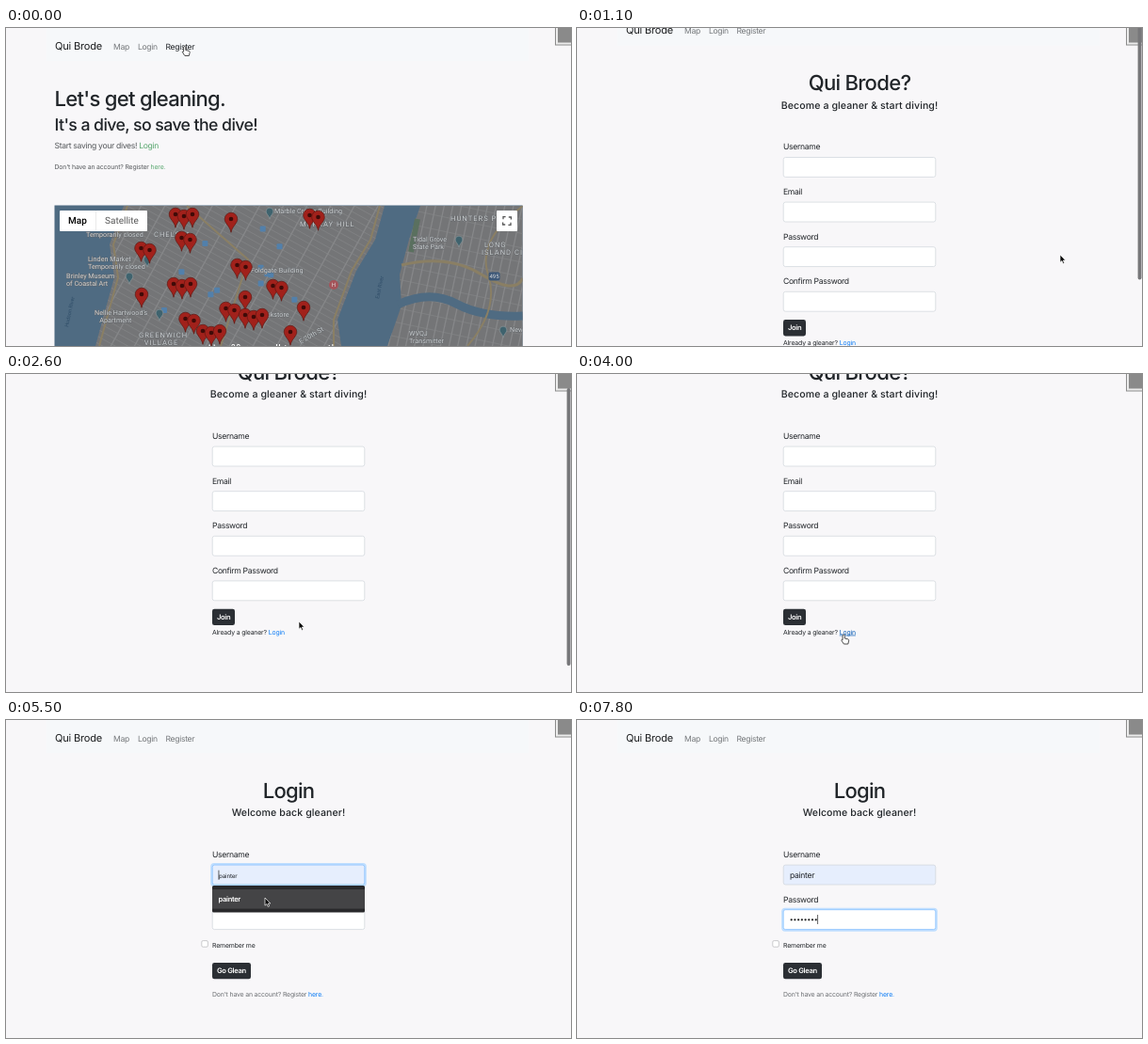
Recreate the animation shown at these times as an HTML page. Size 600 by 338 pixels, loop 8000 ms.

```html
<!DOCTYPE html>
<html lang="en">
<head>
<meta charset="utf-8">
<title>Sign up and log in</title>
<style>
  html, body { margin: 0; width: 100%; height: 100%; overflow: hidden; background: #f8f7f9; }
  svg { display: block; }
  #stage { width: 100vw; height: 100vh; }
  text { font-family: Inter, "Open Sans", sans-serif; font-optical-sizing: none;
         text-rendering: geometricPrecision; fill: #212529; white-space: pre; }
  .h1 { font-size: 22.1px; font-weight: 500; letter-spacing: -.73px; }
  .h2 { font-size: 17.7px; font-weight: 500; letter-spacing: -.58px; }
  .h5 { font-size: 10.6px; font-weight: 500; letter-spacing: .08px; }
  .brand { font-size: 11.07px; letter-spacing: -.2px; fill: #1b1d1f; }
  .body { font-size: 8.6px; letter-spacing: -.32px; }
  .small { font-size: 6.9px; letter-spacing: -.16px; }
  .tiny { font-size: 6.3px; letter-spacing: -.2px; }
  .btn { font-size: 7.6px; font-weight: 600; letter-spacing: -.34px; fill: #fff; }
  .mid { text-anchor: middle; }
  .grey { fill: #6c6f73; }
  .nav { fill: #76797c; }
  .soft { fill: #55585b; }
  .green { fill: #5aa870; }
  .blue { fill: #0a7bf5; }
  .blue.on { fill: #0056b3; text-decoration: underline; }
  .map text { font-family: Roboto, sans-serif; }
  .map .ui { font-size: 10px; fill: #565656; }
  .map .ui.on { font-weight: 500; fill: #000; }
  .map .sign { font-size: 6px; fill: #ddd; text-anchor: middle; }
  .map .poi, .map .area { font-size: 7.2px; fill: #cdd0d2; stroke: #606468; stroke-width: .8px; paint-order: stroke; }
  .map .area { font-size: 7.6px; letter-spacing: 1px; }
  .map .river { font-size: 5.5px; fill: #2f4d68; }
  .map .tip { font-size: 12px; fill: #fff; }
</style>
</head>
<body>
<svg id="stage" viewBox="0 0 600 338" preserveAspectRatio="none"></svg>
<script>
const BRAND = 'Qui Brode', USER = 'painter', LOOP = 8000, STEP = 100;
const ROW = 47.6, DOT = 3.72;

const text = (x, y, cls, s, extra = '') => `<text x="${x}" y="${y}" class="${cls}" ${extra}>${s}</text>`;
const rect = (x, y, w, h, fill, extra = '') =>
  `<rect x="${x}" y="${y}" width="${w}" height="${h}" fill="${fill}" ${extra}/>`;
const path = (d, extra) => `<path d="${d}" ${extra}/>`;
const times = (n, f) => Array.from({ length: n }, (_, i) => f(i)).join('');

const nav = over => rect(43, -20, 512, 55, '#f6f8fa') + text(52, 23, 'brand', BRAND) +
  text(114, 22.5, 'body nav', 'Map') + text(140, 22.5, 'body nav', 'Login') +
  text(169.5, 22.5, over ? 'body' : 'body nav', 'Register');

const title = (big, sub) => text(300, 83, 'h1 mid', big) + text(300, 102.4, 'h5 mid', sub);

const field = (row, label, id) => {
  const y = 153.9 + row * ROW;
  return text(219, y - 7.9, 'body', label) +
    rect(217.2, y - 1.8, 165.6, 25, '#bfdeff', `rx="3.6" id="${id}Ring" visibility="hidden"`) +
    rect(219.2, y + .2, 161.6, 20.9, '#fff', `rx="2.2" stroke="#ced4da" stroke-width=".7" id="${id}Box"`);
};

const button = (y, w, s) => rect(219, y, w, 17.3, '#2b2f34', 'rx="2.3"') + text(224, y + 11.2, 'btn', s);

// --- map -------------------------------------------------------------
const WATER = '#4f6b82', LAND = '#747577';
const ISLAND = 'M125 189 L110 230 L115 265 L95 338 H356 L352 310 L372 258 L392 225 L402 189Z';
const EAST = 'M440 189 L428 225 L418 262 L420 295 L405 338 H549 V189Z';

// Rows of pins: centre x, y and how many stand side by side
const PINS = [[189, 198, 3], [327, 199, 2], [239, 203, 1], [191, 223, 2], [148, 234, 2], [250, 252, 2],
  [187, 272, 3], [288, 274, 2], [144, 283, 1], [254, 286, 1], [238, 298, 2], [263, 305, 3], [195, 309, 2],
  [316, 297, 1], [218, 322, 3], [302, 323, 1]];

// Label x, y, lines and the x of its place mark, if any
const LABELS = [
  [285, 197, 'Marble Crown Building', 280], [85, 222, 'Temporarily closed'],
  [87, 248, 'Linden Market|Temporarily closed', 150], [64, 266, 'Brinley Museum|of Coastal Art', 131],
  [94, 305, 'Nellie Hartwood’s|   Apartment', 163], [260, 260, 'Foldgate Building', 255],
  [268, 307, 'Bookstore'], [432, 227, 'Tidal Grove|State Park', 481],
  [428, 327, 'WVQJ|Transmitter'], [535, 323, 'Newtown', 528]];
const AREAS = [[157, 222, 'CHELSEA'], [312, 211, 'MURRAY HILL'], [472, 205, 'HUNTERS POINT'],
  [505, 233, ' LONG|ISLAND CITY'], [141, 329, 'GREENWICH|  VILLAGE']];

let seed = 7;
const random = () => (seed = seed * 16807 % 2147483647) / 2147483647;

const grid = (clip, cx, cy, deg, gapX, gapY) =>
  `<g clip-path="url(#${clip})"><g transform="translate(${cx} ${cy}) rotate(${deg})" stroke="#868789">` +
  path(times(70, i => `M-300 ${(i - 35) * gapY}h600`), 'stroke-width=".6"') +
  path(times(50, i => `M${(i - 25) * gapX} -300v600`), 'stroke-width="1.3"') + '</g></g>';

const line = (d, color = '#8a7f64', w = 2) => path(d, `fill="none" stroke="${color}" stroke-width="${w}"`);

// A drop of radius r whose point lies below its centre
const drop = (r, fill, edge) => path(
  `M0 ${2.1 * r} C${-.15 * r} ${1.15 * r} ${-r} ${.7 * r} ${-r} 0 A${r} ${r} 0 0 1 ${r} 0 C${r} ${.7 * r} ${.15 * r} ${1.15 * r} 0 ${2.1 * r}Z`,
  `fill="${fill}" stroke="${edge}" stroke-width=".7"`);
const pins = ([x, y, n]) => times(n, i =>
  `<g transform="translate(${x + (i - (n - 1) / 2) * 9} ${y + i % 2 * 2})">` +
  drop(6.8, '#a1211b', '#5f1712') + '<circle r="2.3" fill="#3f0b08"/></g>');
const label = cls => ([x, y, s, mark]) =>
  (mark ? `<g transform="translate(${mark} ${y - 2})">${drop(3.9, '#3f636e', '#8f9598')}</g>` : '') +
  s.split('|').map((part, i) => text(x, y + i * 7.8, cls, part)).join('');
const tilted = (x, y, deg, cls, s) => text(0, 0, cls, s, `transform="translate(${x} ${y}) rotate(${deg})"`);

const map = `<svg class="map" x="51.5" y="188.5" width="497" height="149.5" viewBox="51.5 188.5 497 149.5">
  <clipPath id="isle"><path d="${ISLAND}"/></clipPath><clipPath id="east"><path d="${EAST}"/></clipPath>` +
  rect(51, 188, 498, 150, WATER) + path(ISLAND, `fill="${LAND}"`) + path(EAST, `fill="${LAND}"`) +
  grid('isle', 230, 260, 29, 22, 6.5) + grid('east', 480, 250, 12, 9, 15) +
  line('M416 294 Q450 278 478 293 T549 306', WATER, 9) +
  line('M437 203 L430 238', '#5a705f', 6) +
  line('M129 189 L114 230 L119 265 L99 338') + line('M397 189 L387 225 L367 258 L348 310 V338') +
  line('M192 189 L257 246 L228 338') + line('M420 252 Q470 240 505 262 T549 266', undefined, 3) +
  line('M549 189 Q500 225 512 262 T490 338') +
  times(12, () => rect(165 + 150 * random(), 205 + 100 * random(), 6, 6, '#5280ab', 'rx="1"')) +
  '<circle cx="348" cy="273" r="5" fill="#a5545a"/>' + text(348, 275.2, 'sign', 'H') +
  rect(512.5, 259.5, 12, 9, '#3d5878', 'rx="2"') + text(518.5, 266.2, 'sign', '495') +
  LABELS.map(label('poi')).join('') + AREAS.map(label('area')).join('') +
  tilted(396, 288, -78, 'river', 'East River') + tilted(66, 318, -78, 'river', 'Hudson River') +
  tilted(313, 336, -30, 'poi', 'E 20th St') +
  PINS.map(pins).join('') +
  rect(57, 194, 93, 22, '#fff', 'rx="1"') + rect(95, 194, .6, 22, '#ddd') +
  text(66, 208.4, 'ui on', 'Map') + text(105, 208.4, 'ui', 'Satellite') +
  rect(521, 194, 22, 22, '#fff', 'rx="1"') +
  times(4, i => path('M-4 -1.8V-4.4H-1.4',
    `transform="translate(532 205) rotate(${i * 90})" fill="none" stroke="#555" stroke-width="1.3"`)) +
  text(300, 344.6, 'tip mid', 'Use ⌘ + scroll to zoom the map') + '</svg>';

// --- pages -----------------------------------------------------------
const home = nav(true) + text(51.5, 83, 'h1', 'Let\'s get gleaning.') +
  text(51.5, 109.3, 'h2', 'It\'s a dive, so save the dive!') +
  text(51.5, 127.6, 'body soft', 'Start saving your dives! <tspan class="green">Login</tspan>') +
  text(51.5, 149.6, 'small soft', 'Don\'t have an account? Register <tspan class="green">here.</tspan>') + map;

const register = nav(false) + title(BRAND + '?', 'Become a gleaner &amp; start diving!') +
  ['Username', 'Email', 'Password', 'Confirm Password'].map((s, i) => field(i, s, 'new' + i)).join('') +
  button(326.7, 24, 'Join') +
  text(219, 353.6, 'small', 'Already a gleaner? <tspan class="blue" id="link">Login</tspan>');

const login = nav(false) + title('Login', 'Welcome back gleaner!') +
  field(0, 'Username', 'user') + field(1, 'Password', 'pass') +
  text(226, 168, 'tiny', USER, 'id="hint"') + text(226, 167.6, 'body', USER, 'id="value"') +
  `<g id="dots">${times(8, i => `<circle cx="${227.7 + i * DOT}" cy="212.3" r="1.15" fill="#222"/>`)}</g>` +
  rect(0, 0, .7, 10, '#222', 'id="caret"') +
  rect(207.8, 234.6, 6.6, 6.6, '#fff', 'rx="1.4" stroke="#a9a9ad" stroke-width=".6"') +
  text(219, 241.6, 'small', 'Remember me') + button(258, 41, 'Go Glean') +
  text(219, 294, 'small grey', 'Don\'t have an account? Register <tspan class="blue">here.</tspan>') +
  '<g id="list">' + rect(219, 176, 162, 28.4, '#29292b', 'rx="1.5"') +
  rect(219, 180, 162, 20.6, '#444446', 'id="row"') + text(225.5, 192.8, 'btn', USER) + '</g>';

const hand = path('M2.2 0 C3.2 0 3.3 .8 3.3 1.4 V4 L6.6 4.8 C7.6 5.1 7.8 5.8 7.6 6.8 L6.8 10 H2.4 L.1 6.6 C-.6 5.5 .4 5 1.1 5.7 V1.2 C1.1 .5 1.4 0 2.2 0Z',
  'fill="#fff" stroke="#222" stroke-width=".8" stroke-linejoin="round"');
const arrow = path('M0 0 V8.2 L1.9 6.5 L3.2 9.4 L4.6 8.8 L3.3 6 H5.8Z',
  'fill="#0a0a0a" stroke="#fff" stroke-width=".7" stroke-linejoin="round"');

const $ = id => document.getElementById(id);
$('stage').innerHTML = rect(0, 0, 600, 338, '#f8f7f9') +
  `<g id="home">${home}</g><g id="register">${register}</g><g id="login">${login}</g>` +
  rect(583.5, -2, 18, 20, '#ececec', 'stroke="#8c8c8c"') + rect(586, -2, 15, 17.5, '#8a8a8a') +
  rect(595.6, 0, 3.9, 295, '#77777a', 'id="bar" rx="1.95"') +
  `<g id="arrow">${arrow}</g><g id="hand">${hand}</g>`;

// --- motion ------------------------------------------------------------
// Pointer strokes: from, until, then where the stroke ends
const STROKES = [[0, 500, 472, 156], [700, 900, 513, 241], [2300, 2600, 311, 263], [2600, 3300, 266, 284],
  [3500, 3700, 281, 277], [4400, 5000, 274, 164], [5300, 5500, 275, 189], [5900, 6300, 280, 208]];

const ease = (t, a, b) => {
  const k = Math.max(0, Math.min(1, (t - a) / (b - a)));
  return k * k * (3 - 2 * k);
};
const pointer = t => STROKES.reduce(([x, y], [a, b, tx, ty]) => {
  const k = ease(t, a, b);
  return [x + (tx - x) * k, y + (ty - y) * k];
}, [187.5, 19.5]);

const show = (id, on) => $(id).setAttribute('visibility', on ? 'inherit' : 'hidden');
const move = (id, x, y) => $(id).setAttribute('transform', `translate(${x} ${y})`);
const paint = (id, focus, filled) => {
  show(id + 'Ring', focus);
  $(id + 'Box').setAttribute('stroke', focus ? '#80bdff' : '#ced4da');
  $(id + 'Box').setAttribute('fill', filled ? '#e6eefd' : '#fff');
};

function draw(t) {
  const within = (a, b) => t >= a && t < b;
  show('home', t < 100);
  show('register', within(100, 4200));
  show('login', t >= 4200);

  const scroll = 64 * ease(t, 950, 1400) + 13 * ease(t, 1950, 2300);
  move('register', 0, -scroll);
  $('bar').setAttribute('y', -39.3 + .705 * scroll);
  $('bar').setAttribute('opacity', ease(t, 1000, 1100) - ease(t, 2900, 3300));

  const over = within(3700, 4200), pointing = t < 100 || over;
  $('link').classList.toggle('on', over);
  const [x, y] = pointer(t);
  move('arrow', x, y);
  move('hand', x, y);
  show('hand', pointing);
  show('arrow', !pointing && t < 6600);

  const onUser = within(5000, 6300), onPass = t >= 6300, picked = t >= 5700, hint = within(5400, 5700);
  paint('user', onUser, hint || picked);
  paint('pass', onPass, false);
  show('list', within(5200, 5700));
  show('row', hint);
  show('hint', hint);
  show('value', picked);

  const typed = Math.max(0, Math.min(8, Math.floor((t - 6700) / 100)));
  [...$('dots').children].forEach((d, i) => d.setAttribute('visibility', i < typed ? 'inherit' : 'hidden'));
  show('caret', onUser || onPass);
  $('caret').setAttribute('x', onPass ? 225.6 + typed * DOT : picked ? 253.3 : 225.6);
  $('caret').setAttribute('y', onPass ? 207 : 159.7);
}

const start = performance.now();
function tick() {
  const t = (performance.now() - start) % LOOP;
  draw(Math.floor(t / STEP) * STEP);
  requestAnimationFrame(tick);
}
tick();
</script>
</body>
</html>
```
